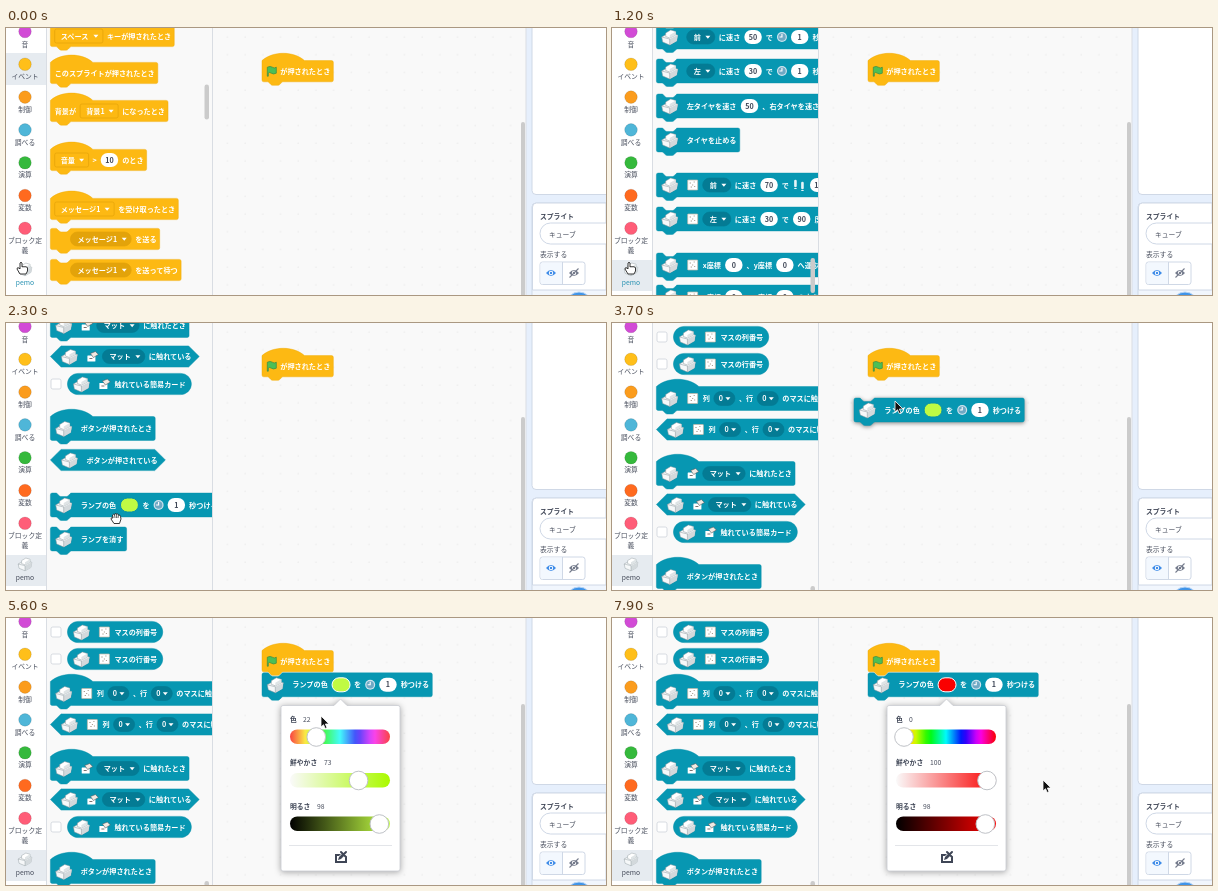
Recreate the animation shown at these times as an HTML page. Size 600 px wide and 267 px high, loop 8 s.

```html
<!DOCTYPE html>
<html>
<head>
<meta charset="utf-8">
<style>
html, body { margin: 0; width: 100%; height: 100%; overflow: hidden; background: #fff }
svg { display: block; width: 600px; height: 267px }
text { font-family: "Noto Sans CJK JP", "Noto Sans CJK", sans-serif; font-size: 6.8px; font-weight: 500; fill: #474d5c; dominant-baseline: central }
.b { font-size: 7.15px; font-weight: 700; fill: #fff }
.m { text-anchor: middle }
.n { font-weight: 700; fill: #3f4656 }
</style>
</head>
<body>
<svg id="stage" viewBox="0 0 600 267"></svg>
<script>
const U = 0.4425, EM = 7.15, LOOP = 8000;
const YELLOW = ['#fdb913', '#eeab08', '#e3a30a'];
const TEAL = ['#0797b2', '#068fa9', '#047b94'];
const $ = id => document.getElementById(id);
const clamp = x => Math.max(0, Math.min(1, x));
let tint, picking = false;

function hsv(h, s, v) {
  const f = n => {
    const k = (n + h * 0.06) % 6;
    return Math.round(2.55 * v * (1 - s / 100 * Math.max(0, Math.min(k, 4 - k, 1))));
  };
  return `rgb(${f(5)},${f(3)},${f(1)})`;
}

const textWidth = s => [...s].reduce((w, c) => w + (c < '\x7f' ? 0.57 : 1), 0) * EM;
const label = (x, y, s, cls = '') => `<text x="${x}" y="${y - 0.4}" class="${cls}">${s}</text>`;
const rect = (x, y, w, h, r, fill, extra = '') =>
  `<rect x="${x}" y="${y}" width="${w}" height="${h}" rx="${r}" fill="${fill}" ${extra}/>`;
const circle = (x, y, r, fill, extra = '') => `<circle cx="${x}" cy="${y}" r="${r}" fill="${fill}" ${extra}/>`;
const path = (d, fill, extra = '') => `<path d="${d}" fill="${fill}" ${extra}/>`;
const at = (x, y, body) => `<g transform="translate(${x} ${y})">${body}</g>`;

// Small box-shaped robot with a raised top, centred on the origin
const thin = 'stroke="#89949a" stroke-width=".5" stroke-linejoin="round"';
const cube = path('M-8 0L-1-4 8-2 7 4 0 8-7 5Z', '#f6f8f9', thin) + path('M0 2L8-2 7 4 0 8Z', '#d3d9dc') +
  path('M-8 0L0 2V8', 'none', thin) +
  path('M-4-4L1-7 6-5.5V-2L0 1-4-.5Z', '#fff', thin) + path('M0-2L6-5.5V-2L0 1Z', '#dfe4e6');

// Fixed-width symbols: [width, markup centred on the origin]
const symbols = {
  '@': [22, at(-2, 0, cube)],
  '#': [12, rect(-5, -5, 10, 10, 0.5, '#fff', 'stroke="#c3b8a6" stroke-width=".7"') +
    path('M-3-2h1.2M1-3h1M-2 2h1.2M2 1v1M-.5 0h1', 'none', 'stroke="#8b7a68" stroke-width=".8"')],
  '~': [12, rect(-5, -1, 8, 6, 0.5, '#fff') + path('M-2-3L3-5 6-2 1 1Z', '#f2e9e2', 'stroke="#4b5a60" stroke-width=".6"') +
    path('M-3 2h3', 'none', 'stroke="#6b6460" stroke-width=".9"')],
  '%': [10, circle(0, 0, 5, '#cfe4ee') + circle(0, 0, 3.8, '#6fa9c4') +
    path('M0-3V0H-2.5', 'none', 'stroke="#fff" stroke-width="1.1"')],
  '&': [13, path('M-4-4v5M3-2v5', 'none', 'stroke="#e8f5f8" stroke-width="2.6" stroke-linecap="round"') +
    path('M-4 3v1M3 5v1', 'none', 'stroke="#e8f5f8" stroke-width="2.4"')],
  '!': [10, path('M-4-4Q-1-5.5 1-4T5-4V2Q2 3.5 0 2T-3 2V5H-4Z', '#4cbf56', 'stroke="#3c8a43" stroke-width=".7"')]
};

function part(token) {
  if (symbols[token]) return [symbols[token][0], at(symbols[token][0] / 2, 0, symbols[token][1])];
  if (token === '*') return [18, rect(0, -7, 18, 14, 7, tint, `stroke="${picking ? '#fff' : TEAL[1]}"`)];
  const s = token.slice(1, -1), w = textWidth(s);
  if (token[0] === '(') {
    const pill = Math.max(17.5, w + 9);
    return [pill, rect(0, -7, pill, 14, 7, '#fff') + label(pill / 2, 0, s, 'b m n')];
  }
  if ('{['.includes(token[0])) {
    const round = token[0] === '{', full = w + (round ? (w < 5 ? 17 : 21) : 19.6), pad = w < 5 ? 5 : round ? 7 : 6;
    return [full, rect(0, -7, full, 14, round ? 7 : 1.8, round ? 'var(--dark)' : 'none', 'stroke="var(--dark)" stroke-width=".7"') +
      label(pad, 0, s, 'b') + path(`M${full - 9.5}-1.3h5l-2.5 3z`, '#fff')];
  }
  return [textWidth(token), label(0, 0, token, 'b')];
}

function outline(kind, w, h) {
  if (kind === 'rep') return `M${h / 2} 0H${w - h / 2}a${h / 2} ${h / 2} 0 0 1 0 ${h}H${h / 2}a${h / 2} ${h / 2} 0 0 1 0-${h}z`;
  if (kind === 'bool') return `M0 ${h / 2}L${h / 2} 0H${w - h / 2}L${w} ${h / 2} ${w - h / 2} ${h}H${h / 2}Z`;
  const top = kind === 'hat' ? 'M0 0C25-22 71-22 96 0'
    : 'M0 4A4 4 0 0 1 4 0H12c2 0 3 1 4 2l4 4c1 1 2 2 4 2h12c2 0 3-1 4-2l4-4c1-1 2-2 4-2';
  return `${top}H${w - 4}a4 4 0 0 1 4 4V${h - 4}a4 4 0 0 1-4 4H48c-2 0-3 1-4 2l-4 4c-1 1-2 2-4 2h-12c-2 0-3-1-4-2l-4-4c-1-1-2-2-4-2H4a4 4 0 0 1-4-4z`;
}

// y is the centre line of the block's text
function block(kind, x, y, src, [fill, edge, dark]) {
  const h = src[0] === '@' && /hat|stack/.test(kind) ? 54 : 48;
  let w = kind === 'stack' && src[0] === '{' ? 20 : { rep: 5, bool: 10 }[kind] || 4.3, body = '';
  for (const token of src.split(' ')) {
    const [width, markup] = part(token);
    body += at(w, 0, markup);
    w += width + 4;
  }
  w += { rep: 1.5, bool: 3.5 }[kind] || -1;
  return `<g style="--dark:${dark}" transform="translate(${x} ${y})">` +
    path(outline(kind, w / U, h), fill, `transform="translate(0 ${-h * U / 2}) scale(${U})" stroke="${edge}" stroke-width="1"`) + body + '</g>';
}

const GAP = 2160;
const events = [
  ['hat', 8, '[スペース] キーが押されたとき'], ['hat', 45, 'このスプライトが押されたとき'],
  ['hat', 83, '背景が [背景1] になったとき'], ['hat', 132, '[音量] > (10) のとき'],
  ['hat', 181, '[メッセージ1] を受け取ったとき'], ['stack', 211, '{メッセージ1} を送る'],
  ['stack', 242, '{メッセージ1} を送って待つ']
];
const robot = [
  ['stack', 9, '@ {前} に速さ (50) で % (1) 秒動かす'], ['stack', 43, '@ {左} に速さ (30) で % (1) 秒回す'],
  ['stack', 78, '@ 左タイヤを速さ (50) 、右タイヤを速さ (50)'], ['stack', 112, '@ タイヤを止める'],
  ['stack', 157, '@ # {前} に速さ (70) で & (100) 動かす'], ['stack', 191, '@ # {左} に速さ (30) で (90) 度回す'],
  ['stack', 237, '@ # x座標 (0) 、y座標 (0) へ運ぶ'], ['stack', 269, '@ # x座標 (0) 、y座標 (0) の方を向く'],
  ['rep', 301, '@ # x座標'], ['rep', 328, '@ # y座標'], ['rep', 355, '@ # 向き'],
  ['stack', 396, '@ # 列 {0} 、行 {0} のマスへ運ぶ'],
  ['rep', 426, '@ # マスの列番号'], ['rep', 453, '@ # マスの行番号'],
  ['hat', 487.5, '@ # 列 {0} 、行 {0} のマスに触れたとき'], ['bool', 518.5, '@ # 列 {0} 、行 {0} のマスに触れている'],
  ['hat', 562.5, '@ ~ {マット} に触れたとき'], ['bool', 593.5, '@ ~ {マット} に触れている'],
  ['rep', 621, '@ ~ 触れている簡易カード'], ['hat', 665.5, '@ ボタンが押されたとき'],
  ['bool', 697, '@ ボタンが押されている'], ['stack', 742, '@ ランプの色 * を % (1) 秒つける'], ['stack', 776, '@ ランプを消す']
];
const between = [
  ['#ffab19', '(1) 秒待つ'], ['#5cb1d6', 'タイマーをリセット'], ['#40bf4a', '(1) から (10) までの乱数'],
  ['#ff8c1a', '変数を (0) にする'], ['#ff6680', 'ブロックを作る']
];

function palette() {
  let out = '';
  for (const [kind, y, src] of events) out += block(kind, 44.4, y - GAP, src, YELLOW);
  for (let i = 0; i < 53; i++) {
    const [color, src] = between[Math.floor(i / 11)];
    out += block('stack', 44.4, -1840 + i * 34, src, [color, color, color]);
  }
  for (const [kind, y, src] of robot) {
    const rep = kind === 'rep';
    if (rep) out += rect(45, y - 5, 10, 10, 1.8, '#fff', 'stroke="#cdd2da" stroke-width=".8"');
    out += block(kind, rep ? 61.4 : 44.4, y, src, TEAL);
  }
  return out;
}

function categories() {
  const list = [['音', '#d24bd6'], ['イベント', '#ffbf1a'], ['制御', '#fb9c1d'], ['調べる', '#4fb6d8'],
    ['演算', '#35b93c'], ['変数', '#ff6a1f'], ['ブロック定', '#ff5d78']];
  return list.map(([name, color], i) => circle(19, 3.5 + i * 32.8, 6.3, color, 'stroke="#0002" stroke-width=".8"') +
    label(19, 16 + i * 32.7, name, 'm')).join('') + label(19, 222, '義', 'm');
}

function sidePanel() {
  const eye = (x, c) => at(x, 245, path('M-5 0Q0-6 5 0Q0 6-5 0Z', c) + circle(0, 0, 2.2, '#fff') + circle(0, 0, 1.2, c));
  const line = 'stroke="#cfd8e6" stroke-width="1"';
  return rect(520, 0, 80, 267, 0, '#e6effc') +
    rect(526, -10, 90, 176.5, 4, '#fff', line) + rect(526, 175, 90, 100, 4, '#f1f6fd', line) +
    path('M526.5 262V179a4 4 0 0 1 4-4H600V262Z', '#fff', line) +
    label(534, 188, 'スプライト', 'n') + rect(534, 195, 90, 21, 10.5, '#fff', line) + label(543, 206, 'キューブ') +
    label(534, 226.5, '表示する') + rect(534, 234, 45, 22.5, 2.5, '#fff', line) +
    path('M556.5 234.5H536.5a2 2 0 0 0-2 2V254a2 2 0 0 0 2 2H556.5Z', '#f3f8fe') + path('M556.5 234V256.5', 'none', line) +
    eye(545, '#3d8be8') + eye(568, '#747b8c') + path('M563.5 249.5L572.5 240.5', 'none', 'stroke="#747b8c" stroke-width="1.1"') +
    circle(573, 277, 13, '#3f94e9', 'stroke="#b9d5f5"');
}

function popup(h, s, v) {
  const rows = [['色', h, n => hsv(n, s, v)], ['鮮やかさ', s, n => hsv(h, n, v)], ['明るさ', v, n => hsv(h, s, n)]];
  let out = path('M277 87.5H328L334.5 81 341 87.5H392a2 2 0 0 1 2 2V251a2 2 0 0 1-2 2H277a2 2 0 0 1-2-2V89.5a2 2 0 0 1 2-2Z',
    '#fff', 'stroke="#c9ccd2" stroke-width=".8" style="filter:drop-shadow(0 1px 3px #0005)"');
  rows.forEach(([name, value, color], i) => {
    const y = 101 + i * 43.5;
    let stops = '';
    for (let n = 0; n <= 100; n += 5) stops += `<stop offset="${n}%" stop-color="${color(n)}"/>`;
    out += `<linearGradient id="g${i}">${stops}</linearGradient>` +
      label(284, y, name, 'n') + label(290 + 7 * name.length, y, Math.round(value)) +
      rect(284, y + 10.5, 100, 14.5, 7.2, `url(#g${i})`) +
      circle(292 + value * 0.83, y + 18, 9.3, '#fff', 'stroke="#bfc2c7" stroke-width="1"');
  });
  return out + path('M283 227.5H386', 'none', 'stroke="#dcdfe4" stroke-width=".8"') +
    at(335, 239, path('M-6-3H0L-2-1H-4V4H4V1L6-1V6H-6Z', '#3f4656') + path('M-3 3l1-3 4-4 2 2-4 4z', '#3f4656') +
      path('M0-5L5 0M2-2L5-5', 'none', 'stroke="#3f4656" stroke-width="2" stroke-linecap="round"'));
}

const ink = 'stroke="#222" stroke-width=".9" stroke-linejoin="round"';
const cursors = {
  point: path('M-2 6L-5 1Q-5-1-3 0L-2 1V-5Q-1-6.5 0-5V-1Q1-2 2-1Q3-2 4-1Q5-1.5 5.5 0V3L4 6Z', '#fff', ink),
  grab: path('M-2 5.5L-5 1Q-5-1-3 0L-3.5-3Q-2.5-4.5-1.5-3Q-1-5.5.5-4Q1.5-5 2.5-3Q4-3.5 4.5-1.5L5 1 3.5 5.5Z', '#fff', ink) +
    path('M-1.4-3L-1 0M.6-4V0M2.5-3L2 0', 'none', 'stroke="#222" stroke-width=".7"'),
  arrow: path('M-3-6V5L-.5 2.7 1.2 6.5 3 5.7 1.4 2H5Z', '#111', 'stroke="#fff" stroke-width=".8"')
};

// Keyframes: [time, ...values], linear between them
function track(keys, t) {
  const i = keys.findIndex(k => k[0] > t);
  if (i < 0) return keys[keys.length - 1].slice(1);
  if (!i) return keys[0].slice(1);
  const a = keys[i - 1], b = keys[i], p = (t - a[0]) / (b[0] - a[0]);
  return a.slice(1).map((v, n) => v + (b[n + 1] - v) * p);
}
const mouse = [[0, 16, 240], [700, 18, 240], [1200, 18, 240], [1500, 161, 246], [2000, 161, 246], [2300, 110, 195],
  [2800, 88, 181], [3200, 88, 181], [3700, 286, 84], [4100, 301, 67], [4200, 301, 67], [4800, 317, 88], [5000, 317, 88],
  [5300, 334, 70], [5400, 334, 70], [5700, 310, 121], [5900, 310, 121], [6300, 283, 121], [6500, 283, 121],
  [6900, 354, 164], [7000, 354, 164], [7400, 377, 164], [7700, 385, 164], [7900, 434, 168]];
const listScroll = [[1300, 0], [1600, 290], [2200, 560], [3300, 560], [3301, 412]];

tint = hsv(22, 73, 98);
$('stage').innerHTML =
  `<defs><pattern id="dots" width="17.7" height="17.7" patternUnits="userSpaceOnUse">${circle(9, 9, 0.6, '#e4e4e4')}</pattern>
  <clipPath id="clip">${rect(41, 0, 165, 267, 0, '#000')}</clipPath></defs>` +
  rect(0, 0, 600, 267, 0, '#fff') + rect(207, 0, 313, 267, 0, '#f9f9f9') + rect(207, 0, 313, 267, 0, 'url(#dots)') +
  '<rect id="bar" x="515" width="4" height="190" rx="2" fill="#cbcbcb"/>' + sidePanel() +
  rect(41, 0, 165, 267, 0, '#f9f9f9') + `<g clip-path="url(#clip)"><g id="list">${palette()}</g></g>` +
  '<rect id="thumb" x="198.5" width="4.5" height="35" rx="2.2" fill="#cbcbcb"/>' +
  path('M40.5 0V267M206.5 0V267M520 0V267', 'none', 'stroke="#d9dde3" stroke-width="1"') +
  '<rect id="chosen" width="40" fill="#e6ebf0"/>' + categories() +
  at(19, 241, `<g transform="scale(.85)">${cube}</g>`) + '<text id="name" x="19" y="254" class="m">pemo</text>' +
  block('hat', 256, 43.2, '! が押されたとき', YELLOW) +
  '<g id="lamp"></g><g id="popup"></g><g id="cursor"></g>';

function draw(t) {
  const [x, y] = track(mouse, t);
  const scroll = t < 1300 ? -GAP * Math.pow(1 - clamp((t - 400) / 400), 3) : track(listScroll, t)[0];
  $('list').setAttribute('transform', `translate(0 ${-scroll})`);
  $('thumb').setAttribute('y', 230 + scroll / 12.45);
  $('chosen').setAttribute('y', t < 500 ? 25 : 232);
  $('chosen').setAttribute('height', t < 500 ? 32 : 31);
  $('name').style.fill = t < 1400 ? '#2b93b3' : '';

  const hue = 22 * (1 - clamp((t - 5900) / 400)), sat = 73 + 27 * clamp((t - 7000) / 400);
  const held = t < 4100;
  tint = hsv(hue, sat, 98);
  picking = t >= 5400;
  $('bar').setAttribute('y', held ? 94 : 86);
  $('lamp').innerHTML = t < 3300 ? '' :
    block('stack', held ? x - 44 : 256, held ? y + 3 : 66.8, '@ ランプの色 * を % (1) 秒つける', TEAL);
  $('lamp').style.filter = held ? 'drop-shadow(0 1px 2px #0007)' : '';
  $('popup').innerHTML = picking ? popup(hue, sat, 98) : '';
  $('popup').style.opacity = clamp((t - 5300) / 200);
  $('cursor').innerHTML = at(x, y, cursors[t < 1400 ? 'point' : t < 3300 ? 'grab' : 'arrow']);
}

let last = -1;
function tick() {
  const t = Math.floor(performance.now() % LOOP / 100) * 100;
  if (t !== last) draw(last = t);
  requestAnimationFrame(tick);
}
tick();
</script>
</body>
</html>
```
